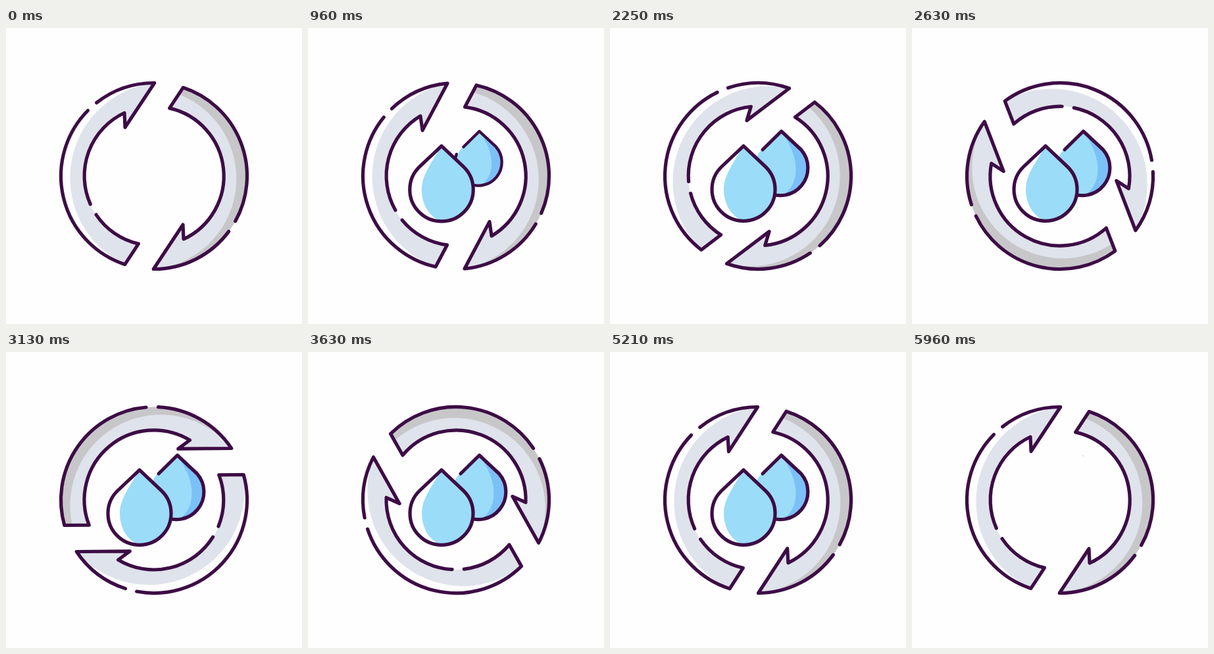
An HTML page for the animation above (6000 ms loop, 450x450 px).

```html
<!DOCTYPE html>
<html lang="en">
<head>
<meta charset="utf-8">
<title>Water cycle</title>
<style>
html, body { margin: 0; height: 100%; overflow: hidden; background: #fefefe; }
svg { display: block; width: 100vw; height: 100vh; }
.line { fill: none; stroke: #3d0c45; stroke-width: 5.2; stroke-linecap: round; stroke-linejoin: round; }
.dot { fill: #ffdb85; stroke: #3d0c45; stroke-width: 4.5; }
</style>
</head>
<body>
<svg viewBox="0 0 450 450">
  <g id="small">
    <path fill="#9bdcf9" d="M0 0L30 28A42 42 0 1 1-30 28Z"/>
    <path fill="#7cc0f8" d="M0 0L30 28A42 42 0 0 1 0 99.4C14 90 22 77 22 58S14 20 0 0Z"/>
    <path class="line" d="M-28.5 28L0 0L30 28A42 42 0 1 1-41 41"/>
  </g>
  <g id="big">
    <path fill="#fefefe" d="M0 0L33.5 31.7A48 48 0 1 1-33.5 31.7Z"/>
    <path fill="#9bdcf9" d="M0 0L33.5 31.7A48 48 0 0 1 0 114.1C-19 107 -30 88 -30 66S-14 24 0 0Z"/>
    <path class="line" d="M0 0L33.5 31.7A48 48 0 1 1-33.5 31.7Z"/>
  </g>
  <g id="ring"></g>
  <g id="dots"></g>
</svg>
<script>
const LOOP = 6000, OUT = 141.5, IN = 105.8;
const $ = id => document.getElementById(id);

// Point on a circle around the ring's centre, angle in degrees
const at = (deg, r) => {
  const a = deg * Math.PI / 180;
  return `${(r * Math.cos(a)).toFixed(2)} ${(r * Math.sin(a)).toFixed(2)}`;
};
const arc = (r, sweep, end) => `A${r} ${r} 0 0 ${sweep} ${end}`;
const fill = (d, color) => `<path d="${d}" fill="${color}"/>`;
const line = d => `<path d="${d}" class="line"/>`;

const TIP = at(270.3, OUT), TAIL = at(108.2, OUT), TAIL_IN = at(102.9, IN);
const HEAD = 'L-44 -74L-45 -96';
const body = fill(`M${TIP}${HEAD}${arc(IN, 0, TAIL_IN)}L${TAIL}${arc(OUT, 1, TIP)}Z`, '#dfe3eb');

// Band along the outer edge, bounded inside by a flatter arc
const crescent = (end, r, color) =>
  fill(`M${TIP}${arc(OUT, 0, TAIL)}L${end}${arc(r, 1, TIP)}Z`, color);

$('ring').innerHTML =
  body + crescent(TAIL, 145.4, '#fefefe') +
  line(`M${at(231.9, OUT)}${arc(OUT, 1, TIP)}${HEAD}${arc(IN, 0, at(156.1, IN))}` +
       `M${at(146.2, IN)}${arc(IN, 0, TAIL_IN)}L${TAIL}${arc(OUT, 1, at(224.7, OUT))}`) +
  '<g transform="rotate(180)">' +
  body + crescent(at(107, 130), 138, '#c7c7c9') +
  line(`M${at(216.6, OUT)}${arc(OUT, 1, TIP)}${HEAD}${arc(IN, 0, TAIL_IN)}` +
       `L${TAIL}${arc(OUT, 1, at(209.1, OUT))}`) +
  '</g>';

// Directions of the dots, in order of appearance
const dotAngles = [40.7, -37.6, 141.3, -51.2, 225, 126.3];
$('dots').innerHTML = dotAngles.map(() => '<circle class="dot" r="8.5"/>').join('');

// Smooth step from 0 to 1
const ramp = x => {
  const c = Math.min(1, Math.max(0, x));
  return c * c * (3 - 2 * c);
};

// Bezier ease with flat ends and handles at x1 and x2
function ease(x, x1, x2) {
  let lo = 0, hi = 1;
  for (let i = 0; i < 30; i++) {
    const s = (lo + hi) / 2, u = 1 - s;
    if (3 * u * u * s * x1 + 3 * u * s * s * x2 + s * s * s < x) lo = s; else hi = s;
  }
  return ramp(lo);
}

// Slow wind-up, then one full turn that settles
function spin(t) {
  const start = 1910, end = 5400, back = -11;
  if (t < start) return back * ramp(t / start);
  return back + (360 - back) * ease(Math.min(1, (t - start) / (end - start)), 0.23, 0.13);
}

// Grow with a short wobble, shrink away at the end
function dropScale(t, start, end) {
  const age = t - start;
  const wobble = 0.06 * Math.cos(Math.PI * (age / 700 - 1)) * (1 - ramp((age - 1200) / 500));
  return ramp(age / 600) * (1 + wobble) * ramp((end - t) / 600);
}

// Two pulses with a dip between them
function dotRadius(age) {
  const phase = age / 700;
  if (phase < 0 || phase > 4) return 0;
  const wave = (1 - Math.cos(Math.PI * phase)) / 2;
  return phase > 1 && phase < 3 ? 5 + 6.3 * wave : 11.3 * wave;
}

const place = (el, pos, scale) =>
  el.setAttribute('transform', `translate(${pos}) scale(${scale})`);

function draw(now) {
  const t = now % LOOP;
  $('ring').setAttribute('transform', `translate(225 225) rotate(${spin(t)})`);
  place($('big'), '203 179.3', dropScale(t, 430, 5980));
  place($('small'), '260.5 157', dropScale(t, 520, 6005));
  dotAngles.forEach((deg, i) =>
    place($('dots').children[i], `225 225) translate(${at(deg, 168)}`,
      dotRadius(t - 1555 - 200 * i) / 10.75));
  requestAnimationFrame(draw);
}
requestAnimationFrame(draw);
</script>
</body>
</html>
```
